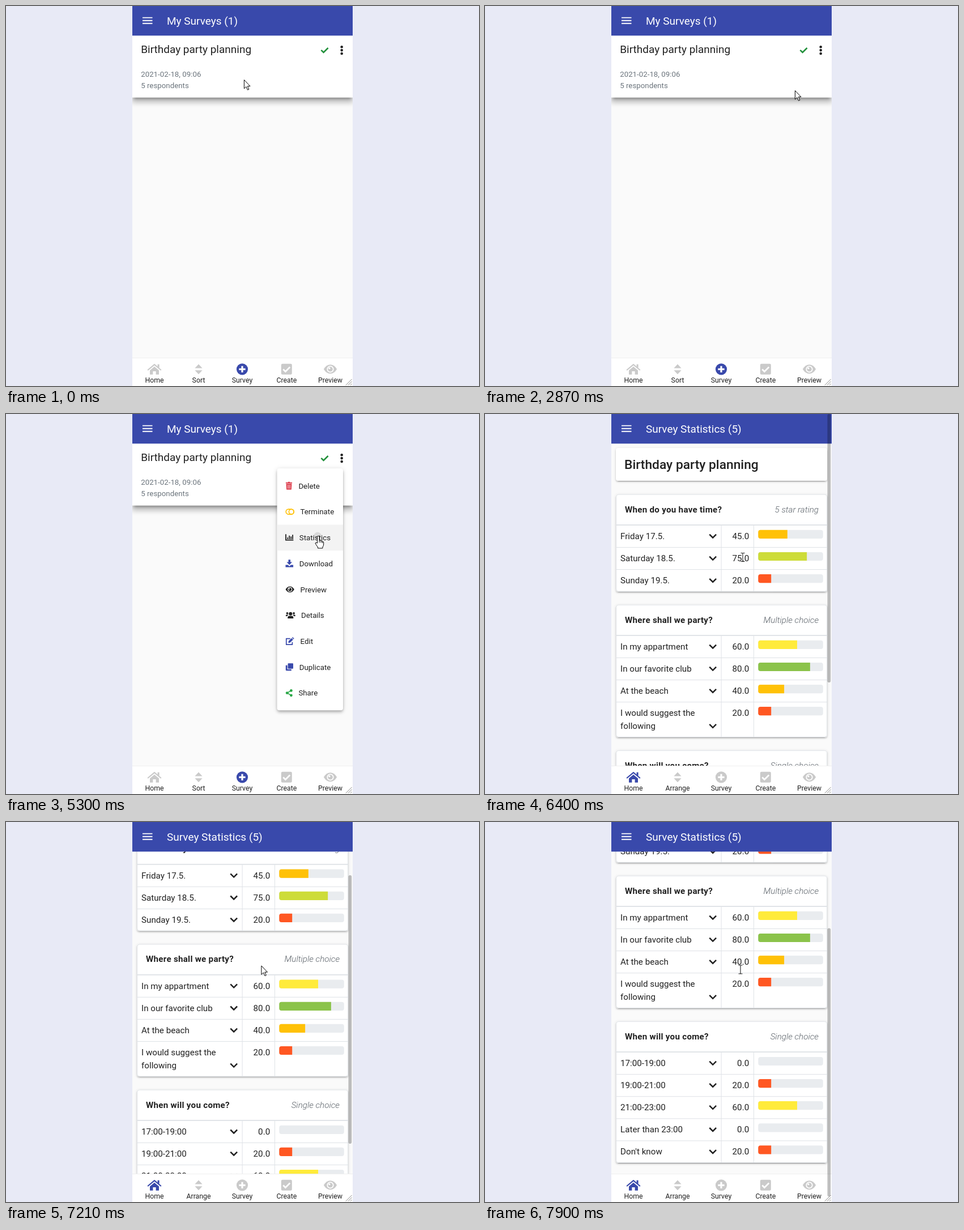
These frames come from a looping animation (835 px wide and 671 px high, 8000 ms). An HTML page:

```html
<!DOCTYPE html>
<html lang="en">
<head>
<meta charset="utf-8">
<title>Survey app</title>
<style>
  html, body { margin: 0; width: 100%; height: 100%; overflow: hidden; background: #e8eaf6; }
  svg { display: block; width: 100%; height: 100%; }
  text { font-family: Roboto, sans-serif; fill: #212121; white-space: pre; }
  .bold { font-weight: 700; letter-spacing: .25px; }
  .light { font-weight: 300; font-style: italic; fill: #5c636a; }
  .muted { fill: #6c757d; }
</style>
</head>
<body>
<svg id="stage" viewBox="0 0 835 671" xmlns="http://www.w3.org/2000/svg"></svg>
<script>
const LOOP = 8000;
const BLUE = '#3949ab', GREY = '#cacaca', INK = '#212121', LINE = '#dee2e6';

// Drawing helpers, each returning SVG markup
const rect = (x, y, w, h, fill, more = '') =>
  `<rect x="${x}" y="${y}" width="${w}" height="${h}" fill="${fill}" ${more}/>`;
const text = (x, y, size, str, more = '') =>
  `<text x="${x}" y="${y}" font-size="${size}" ${more}>${str}</text>`;
const fill = (d, color) => `<path d="${d}" fill="${color}"/>`;
const stroke = (d, color, width, more = '') =>
  `<path d="${d}" fill="none" stroke="${color}" stroke-width="${width}" ${more}/>`;
const disc = (x, y, r, color) => `<circle cx="${x}" cy="${y}" r="${r}" fill="${color}"/>`;
const at = (x, y, inner, more = '') => `<g transform="translate(${x} ${y})" ${more}>${inner}</g>`;

// Layers are [offset y, blur, spread, opacity], as in box-shadow
const LOW = [[3, 1, -2, .2], [2, 2, 0, .14], [1, 5, 0, .12]];
const MID = [[2, 4, -1, .2], [4, 5, 0, .14], [1, 10, 0, .12]];
const HIGH = [[5, 5, -3, .3], [8, 10, 1, .16], [3, 14, 2, .14]];
const shadowed = (x, y, w, h, r, layers) =>
  layers.map(([dy, blur, s, a]) => rect(x - s, y - s + dy, w + 2 * s, h + 2 * s, '#000',
    `rx="${r}" opacity="${a}" style="filter:blur(${blur / 2}px)"`)).join('') +
  rect(x, y, w, h, '#fff', `rx="${r}"`);

const eye = (color, k = 1) => `<g transform="scale(${k})">` +
  fill('M-11.6 0Q-7-8 0-8T11.6 0Q7 8 0 8T-11.6 0Z', color) +
  disc(0, 0, 6.1, '#fff') + disc(0, 0, 4.3, color) + disc(-1.6, -1.6, 1.6, '#fff') + '</g>';

const navIcons = {
  home: c => stroke('M-11.2 1.2L0-8.2 11.2 1.2', c, 2.1, 'stroke-linecap="round" stroke-linejoin="round"') +
    rect(5.6, -8.6, 3, 6, c) + fill('M-8 2.2L0-4.5 8 2.2V9.5H2.6V3.6H-2.6V9.5H-8Z', c),
  sort: c => fill('M0-8.8L6.6-1.8H-6.6ZM0 9L6.6 2H-6.6Z', c),
  plus: c => disc(0, 0, 10.1, c) + stroke('M-5.6 0H5.6M0-5.6V5.6', '#fff', 3.2),
  box: c => rect(-9.5, -9.5, 19, 19, c, 'rx="2.2"') + stroke('M-6 .2L-2 4.2 6-3.8', '#fff', 2.7),
  eye: c => eye(c)
};

const nav = (second, active) =>
  rect(223, 621, 389, 50, '#fff') + rect(223, 621, 389, 1, '#efefef') +
  [['Home', 'home', 262], [second, 'sort', 340], ['Survey', 'plus', 417],
   ['Create', 'box', 495.3], ['Preview', 'eye', 572.5]].map(([label, icon, x]) =>
    at(x, 641.3, navIcons[icon](icon === active ? BLUE : GREY)) +
    text(x, 665, 12.3, label, 'text-anchor="middle"')).join('');

const header = title => rect(223, 0, 389, 52.3, BLUE) +
  stroke('M241 20.6H258.5M241 25.7H258.5M241 30.8H258.5', '#fff', 1.9) +
  text(284, 32.8, 19, title, 'style="fill:#fff"');

// Survey list
const listPage = shadowed(223, 52, 389, 109.7, 0, HIGH) +
  text(238.2, 83, 19, 'Birthday party planning') +
  text(238.2, 125, 13.3, '2021-02-18, 09:06', 'class="muted"') +
  text(238.2, 145, 13.3, '5 respondents', 'class="muted"') +
  stroke('M556.4 77.8L560.6 82 568.6 74', '#23913c', 2.6) +
  [72.2, 78.1, 84].map(y => disc(592.7, y, 2.3, INK)).join('') +
  header('My Surveys (1)') + nav('Sort', 'plus');

// Context menu
const ROW = 45.72, MENU_TOP = 104;
const menuIcons = {
  trash: c => fill('M-5.6-6H-2L-1.3-7H1.3L2-6H5.6V-4.4H-5.6ZM-4.9-3.6H4.9L4.3 6.6H-4.3Z', c) +
    stroke('M-2.3-2V5M0-2V5M2.3-2V5', '#fff', .8),
  toggle: c => `<rect x="-7" y="-4.5" width="14" height="9" rx="4.5" fill="none" stroke="${c}" stroke-width="1.6"/>` +
    `<circle cx="2.6" r="4.4" fill="none" stroke="${c}" stroke-width="1.6"/>`,
  chart: c => stroke('M-6.2-6V4.4H7.2', c, 1.8) + stroke('M-3 2.6V-.4M0 2.6V-3.6M3 2.6V-2M5.9 2.6V-5', c, 1.8),
  download: c => fill('M-1.8-6.8H1.8V-2.4H4.8L0 2.6-4.8-2.4H-1.8ZM-6.8 2.4H-2.6L0 5 2.6 2.4H6.8V6.6H-6.8Z', c),
  eye: c => eye(c, .66),
  users: c => disc(0, -2.6, 3, c) + disc(-5.8, -3.6, 1.9, c) + disc(5.8, -3.6, 1.9, c) +
    fill('M-5 5.6V4Q-5 1-2 1H2Q5 1 5 4V5.6ZM-8.4 1.6V.4Q-8.4-1-7-1H-4.4L-3.6-.4Q-5.6.4-6 1.6ZM8.4 1.6V.4Q8.4-1 7-1H4.4L3.6-.4Q5.6.4 6 1.6Z', c),
  edit: c => stroke('M1-4.6H-6V6H4.6V1.6', c, 1.7, 'stroke-linejoin="round"') +
    fill('M-2.4 3L-2-.2 3.4-5.4 6-2.8.6 2.6ZM4.1-6.2L5.3-7.2 7.8-4.7 6.7-3.5Z', c),
  clone: c => rect(-2.8, -6.6, 9.4, 9.4, c, 'rx="1"') + fill('M-6.6-3.2H-3.8V3.8H3.4V6.4H-5.6L-6.6 5.4Z', c),
  share: c => stroke('M3.8-4.2L-3.6 0 3.8 4.2', c, 1.6) +
    disc(3.6, -4.2, 2.4, c) + disc(-3.6, 0, 2.4, c) + disc(3.6, 4.2, 2.4, c)
};
const menuItems = [
  ['Delete', 'trash', '#dc3545', 499.5, 516.4], ['Terminate', 'toggle', '#ffc107', 501.2, 519.5],
  ['Statistics', 'chart', INK, 500.2, 517.8], ['Download', 'download', BLUE, 500.3, 517.8],
  ['Preview', 'eye', INK, 501.2, 519.5], ['Details', 'users', INK, 502.3, 521],
  ['Edit', 'edit', BLUE, 500.8, 519.5], ['Duplicate', 'clone', BLUE, 500.4, 517.8],
  ['Share', 'share', '#28a745', 499.8, 516.4]
];
const menuPanel = shadowed(478.5, 96, 116.5, 427.3, 4, MID) +
  `<rect id="hover" x="478.5" width="116.5" height="${ROW}" fill="#f3f3f3"/>` +
  '<circle id="ripple" cx="550" cy="215" fill="#000" opacity=".1" clip-path="url(#row)"/>' +
  menuItems.map(([label, icon, color, iconX, textX], i) => {
    const y = MENU_TOP + ROW * (i + .5);
    return at(iconX, y, menuIcons[icon](color)) + text(textX, y + 4.8, 13.3, label);
  }).join('');

// Statistics
const STEP = 39.1, HEAD = 54.7, WRAP = 23, GAP = 23;
const barColor = v => v > 75 ? '#8bc34a' : v > 60 ? '#cddc39' : v > 45 ? '#ffeb3b' : v > 20 ? '#ffc107' : '#ff5722';
const bar = (y, value) => {
  const w = 114.5 * value / 100;
  return rect(482.3, y, 114.5, 15.2, '#e9ecef', 'rx="4"') +
    (value ? fill(`M486.3 ${y}H${482.3 + w}v15.2H486.3a4 4 0 0 1-4-4v-7.2a4 4 0 0 1 4-4Z`, barColor(value)) : '');
};
const tableRow = (y, lines, value, first) => {
  const extra = (lines.length - 1) * WRAP;
  return (first ? '' : rect(231.5, y - .5, 373, 1, LINE)) +
    lines.map((line, i) => text(239, y + 24.5 + i * WRAP, 15.2, line)).join('') +
    stroke(`M396.3 ${y + 16.2 + extra}l5.9 5.9 5.9-5.9`, INK, 2.5) +
    text(466.2, y + 24.5, 15.2, value.toFixed(1), 'text-anchor="end"') + bar(y + 8.4, value);
};
const questions = [
  ['When do you have time?', '5 star rating', [['Friday 17.5.', 45], ['Saturday 18.5.', 75], ['Sunday 19.5.', 20]]],
  ['Where shall we party?', 'Multiple choice', [['In my appartment', 60], ['In our favorite club', 80],
    ['At the beach', 40], ['I would suggest the|following', 20]]],
  ['When will you come?', 'Single choice', [['17:00-19:00', 0], ['19:00-21:00', 20], ['21:00-23:00', 60],
    ['Later than 23:00', 0], ["Don't know", 20]]]
];
let cardY = 141.7;
const cards = questions.map(([title, kind, rows]) => {
  const start = cardY;
  let y = start + HEAD;
  const body = rows.map(([label, value], i) => {
    const lines = label.split('|');
    const row = tableRow(y, lines, value, i === 0);
    y += STEP + (lines.length - 1) * WRAP;
    return row;
  }).join('');
  const h = y - start;
  cardY = y + GAP;
  return shadowed(231.2, start, 373, h, 4, LOW) +
    rect(231.7, start + .5, 372, h - 1, 'none', `rx="4" stroke="${LINE}"`) +
    text(247, start + 32, 15.2, title, 'class="bold"') +
    text(589, start + 32, 15.2, kind, 'class="light" text-anchor="end"') +
    rect(231.5, start + HEAD - 1.3, 372.5, 1.8, LINE) +
    rect(416.6, start + HEAD, 1, h - HEAD, LINE) + rect(474, start + HEAD, 1, h - HEAD, LINE) + body;
}).join('');
const statsPage = '<g clip-path="url(#app)"><g id="content">' +
  shadowed(231, 60, 373, 58, 4, LOW) +
  text(246, 97.4, 22.8, 'Birthday party planning', 'font-weight="500"') + cards + '</g></g>' +
  header('Survey Statistics (5)') + nav('Arrange', 'home') +
  '<rect id="thumb" x="604.5" width="5.7" height="474" rx="2.8" fill="#000" opacity=".25"/>';

const cursors = {
  arrow: '<path d="M.4.4V15.8L4 12.5 6.5 18.2 8.8 17.2 6.4 11.6H11Z" fill="#fff" stroke="#000"/>',
  beam: stroke('M-3.5-7.5H-1Q0-7.5 0-6.5 0-7.5 1-7.5H3.5M0-6.5V6.5M-3.5 7.5H-1Q0 7.5 0 6.5 0 7.5 1 7.5H3.5', '#222', 1.1),
  hand: '<path d="M-2 13V2.2a1.8 1.8 0 0 1 3.6 0V8q2.6-.6 3 1 2.2-.5 2.6 1.1 2 0 2 2V15q0 2.8-1.8 5v2H-1v-2q-2.4-2.6-4.6-7 .8-2.2 3.6 0Z" fill="#fff" stroke="#000" stroke-linejoin="round"/>' +
    stroke('M1.6 8V12M4.6 9V12.4M7.2 10.1V13', '#000', 1)
};

const $ = id => document.getElementById(id);
$('stage').innerHTML = `<defs>
  <clipPath id="app">${rect(223, 0, 389, 671, '#000')}</clipPath>
  <clipPath id="row">${rect(478.5, MENU_TOP + 2 * ROW, 116.5, ROW, '#000')}</clipPath></defs>` +
  rect(0, 0, 835, 671, '#e8eaf6') + rect(223, 0, 389, 671, '#fafafa') +
  `<g id="list" clip-path="url(#app)">${listPage}</g><g id="menu">${menuPanel}</g><g id="stats">${statsPage}</g>` +
  stroke('M600 669.5L610.5 659M604 669.5L610.5 663M608 669.5L610.5 667', '#777', .9) +
  Object.entries(cursors).map(([name, art]) => `<g id="${name}">${art}</g>`).join('');
const show = (id, on) => { $(id).style.display = on ? '' : 'none'; };

// [first change, last change, steps, x, y, shape]
const moves = [
  [310, 640, 4, 350, 130, 'arrow'], [750, 1090, 4, 246.5, 145.5, 'beam'], [1190, 1190, 1, 234, 146, 'arrow'],
  [1420, 1860, 5, 241, 149, 'arrow'], [2080, 2080, 1, 262, 148.5, 'beam'], [2290, 2870, 6, 547, 149, 'arrow'],
  [2980, 3090, 2, 572, 122, 'arrow'], [3200, 3640, 5, 592, 77, 'hand'], [3860, 4170, 4, 592, 71, 'hand'],
  [4410, 4410, 1, 587, 89, 'arrow'], [4520, 5180, 7, 551.5, 215, 'hand'], [5510, 5510, 1, 550, 215, 'arrow'],
  [6080, 6290, 3, 472, 247, 'arrow'], [6400, 6400, 1, 455, 253, 'beam'], [7210, 7210, 1, 450.5, 253.5, 'arrow'],
  [7900, 7900, 1, 451, 260.5, 'beam']
];
const scrolls = [[0, 0], [6650, 17], [6770, 53.5], [6880, 98], [6990, 121.2], [7320, 140], [7430, 176],
  [7540, 218], [7650, 238], [7790, 242]];

function pointer(t) {
  let x = 420, y = 130, shape = 'arrow';
  for (const [from, to, n, toX, toY, kind] of moves) {
    if (t < from) break;
    const k = Math.min(n, 1 + Math.floor((t - from) / (to - from || 1) * (n - 1) + 1e-6));
    x += (toX - x) * k / n;
    y += (toY - y) * k / n;
    shape = kind;
  }
  return { x, y, shape };
}

function draw(t) {
  const { x, y, shape } = pointer(t);
  for (const name in cursors) show(name, name === shape);
  $(shape).setAttribute('transform', `translate(${x} ${y})`);

  const stats = t >= 5510;
  show('list', !stats);
  show('stats', stats);

  show('menu', t >= 3970 && !stats);
  const opening = t < 4080;
  $('menu').setAttribute('opacity', opening ? .5 : 1);
  $('menu').setAttribute('transform', opening ? 'translate(595 96) scale(.9) translate(-595 -96)' : 'translate(0 0)');
  const row = Math.floor((y - MENU_TOP) / ROW);
  show('hover', row >= 0);
  $('hover').setAttribute('y', MENU_TOP + Math.max(0, row) * ROW);
  $('ripple').setAttribute('r', t < 5300 ? 0 : t < 5410 ? 6.5 : 45);

  const scroll = scrolls.filter(([start]) => start <= t).pop()[1];
  $('content').setAttribute('transform', `translate(0 ${-scroll})`);
  $('thumb').setAttribute('y', scroll * .775);
}

function tick() {
  draw(performance.now() % LOOP);
  requestAnimationFrame(tick);
}
tick();
</script>
</body>
</html>
```
